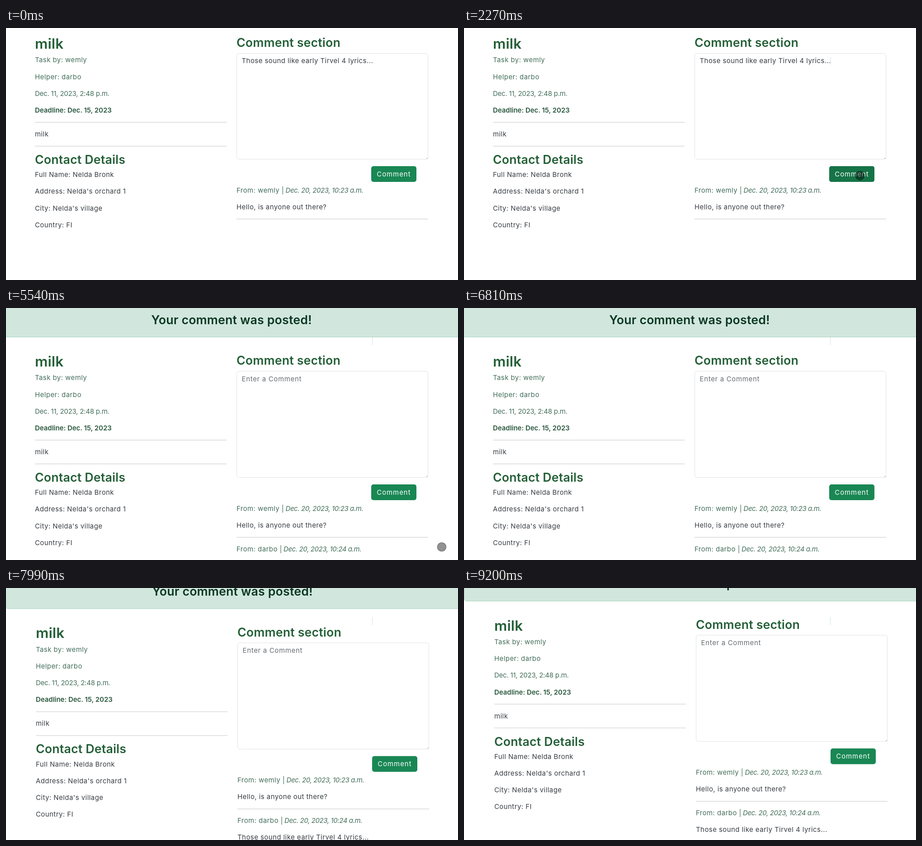
Animation, 1000 px wide and 560 px high, one loop 9790 ms. Source, as an HTML page:

```html
<!DOCTYPE html>
<html lang="en">
<head>
<meta charset="utf-8">
<title>Posting a comment</title>
<style>
  html, body { margin: 0; width: 100%; height: 100%; overflow: hidden; background: #fff; }
  svg { display: block; width: 100vw; height: 100vh; }
  text { font: 400 14.9px Inter, "Open Sans", sans-serif; letter-spacing: .48px; fill: #363b40; white-space: pre; }
  .head { font-size: 26.7px; font-weight: 600; letter-spacing: .18px; fill: #235f37; }
  .title { font-size: 31.4px; }
  .alert { fill: #0a3622; text-anchor: middle; }
  .meta { fill: #416c59; }
  .date { letter-spacing: -.18px; }
  .em { font-style: italic; letter-spacing: -.35px; }
  .due { font-weight: 600; letter-spacing: .02px; fill: #27563c; }
  .hint { fill: #656b70; letter-spacing: .72px; }
  .btn { fill: #fff; letter-spacing: 1px; text-anchor: middle; }
  .rule { stroke: #c4c7c8; }
</style>
</head>
<body>
<svg viewBox="0 0 1000 560">
  <g id="scroll">
    <g id="banner">
      <rect x="-2.5" y="-20" width="1010" height="84.5" rx="5" fill="#d1e7dd" stroke="#a3cfbb"/>
      <text class="head alert" x="499" y="35.5">Your comment was posted!</text>
    </g>
    <g id="page">
      <g id="copy"></g>
      <rect id="ring" x="508.5" y="54.5" width="427" height="239" rx="7" fill="none" stroke="#0d6efd" stroke-opacity=".25" stroke-width="4"/>
      <rect id="box" x="510.5" y="56.5" width="423" height="235" rx="5" fill="none" stroke="#dee2e6"/>
      <text id="draft" x="521.5" y="78">Those sound like early Tirvel 4 lyrics...</text>
      <text id="hint" class="hint" x="521.5" y="78.5">Enter a Comment</text>
      <g id="lower">
        <path d="M930.5 291l2.5-2.5" stroke="#777"/>
        <rect x="808" y="307" width="100" height="35" rx="5" fill="#198754"/>
        <rect id="press" x="808" y="307" width="100" height="35" rx="5" fill="#157347"/>
        <text class="btn" x="857.9" y="329.5">Comment</text>
        <g id="first"></g>
        <g id="reply"></g>
      </g>
    </g>
  </g>
  <path id="caret" d="M810.5 65v17" stroke="#d0e3ec"/>
  <circle id="cursor" r="9.8" fill="#000" fill-opacity=".43" stroke="#000" stroke-opacity=".28" stroke-width="1.6"/>
</svg>
<script>
const LOOP = 9790, TICK = 1000 / 15;
const el = id => document.getElementById(id);
const clamp = v => Math.min(1, Math.max(0, v));
const smooth = v => { v = clamp(v); return v * v * (3 - 2 * v); };
const show = (id, on) => el(id).setAttribute("visibility", on ? "visible" : "hidden");
const move = (id, x, y) => el(id).setAttribute("transform", `translate(${x} ${y})`);

const text = (x, y, cls, str) => `<text x="${x}" y="${y}" class="${cls}">${str}</text>`;
const rule = (x, y) => `<path class="rule" d="M${x} ${y}h424"/>`;
const comment = (y, user, dateX, time, body) =>
  text(510, y, "meta", `From: ${user} |`) +
  text(dateX, y, "meta em", `Dec. 20, 2023, ${time} a.m.`) +
  text(510, y + 37.3, "", body);

el("copy").innerHTML =
  text(64, 46, "head title", "milk") +
  text(64, 76.3, "meta", "Task by: wemly") +
  text(64, 113.5, "meta", "Helper: darbo") +
  text(64, 150.7, "meta date", "Dec. 11, 2023, 2:48 p.m.") +
  text(64, 188, "due", "Deadline: Dec. 15, 2023") +
  rule(64, 209.5) + text(64, 241, "", "milk") + rule(64, 262.5) +
  text(64, 302, "head", "Contact Details") +
  ["Full Name: Nelda Bronk", "Address: Nelda's orchard 1", "City: Nelda's village", "Country: FI"]
    .map((s, i) => text(64, 331.2 + i * 37.2, "", s)).join("") +
  text(510, 42.3, "head", "Comment section");
el("first").innerHTML =
  comment(365.5, "wemly", 618.5, "10:23", "Hello, is anyone out there?") + rule(510, 424.5);
el("reply").innerHTML =
  comment(455.5, "darbo", 614, "10:24", el("draft").textContent);

// Pointer strokes: first tick, last tick, ticks of travel, then a quadratic curve
const strokes = [
  [13, 38, 8, 984, 337, 930, 318, 876, 328],
  [38, 39, 1, 901, 336, 901, 336, 901, 336],
  [68, 73, 5, 957, 558, 965, 514, 967, 562],
  [83, 88, 5, 964, 531, 956, 515, 932, 566],
  [99, 102, 2, 574, 525, 530, 447, 485, 368],
  [136, 138, 1, 789, 326, 668, 168, 546, 11]
];

function movePointer(k) {
  const s = strokes.find(s => k >= s[0] && k < s[1]);
  show("cursor", s);
  if (!s) return;
  const [from, , span, x0, y0, cx, cy, x1, y1] = s;
  let p = clamp((k - from) / span);
  if (span === 8) p = 1 - (1 - p) ** 2;
  const curve = (a, b, c) => (1 - p) ** 2 * a + 2 * p * (1 - p) * b + p * p * c;
  el("cursor").setAttribute("cx", curve(x0, cx, x1));
  el("cursor").setAttribute("cy", curve(y0, cy, y1));
}

function draw(ms) {
  const k = Math.floor((ms + 12) / TICK);
  const posted = k >= 50;
  show("banner", posted);
  show("reply", posted);
  show("hint", posted);
  show("draft", !posted);
  show("caret", k >= 28);

  const focus = smooth((k - 25) / 3) * (1 - smooth((k - 31) / 3));
  el("ring").setAttribute("opacity", focus);
  el("box").setAttribute("stroke", focus > .5 ? "#86b7fe" : "#dee2e6");
  el("press").setAttribute("opacity", posted ? 0 : clamp((k - 26) / 3));

  // The banner pushes the page down; the lower part rounds to one pixel more
  const grow = posted ? 1 : 0;
  move("page", 0, posted ? 84 : 0);
  move("lower", 0, grow);
  el("box").setAttribute("height", 235 + grow);

  const dx = k < 118 ? 0 : k < 126 ? 2 : 3;
  const dy = 34.5 * smooth((k - 116.85) / 6) + (k >= 126 ? 1 : 0);
  move("scroll", dx, -dy);
  movePointer(k);
}

function loop() {
  draw(performance.now() % LOOP);
  requestAnimationFrame(loop);
}
loop();
</script>
</body>
</html>
```
